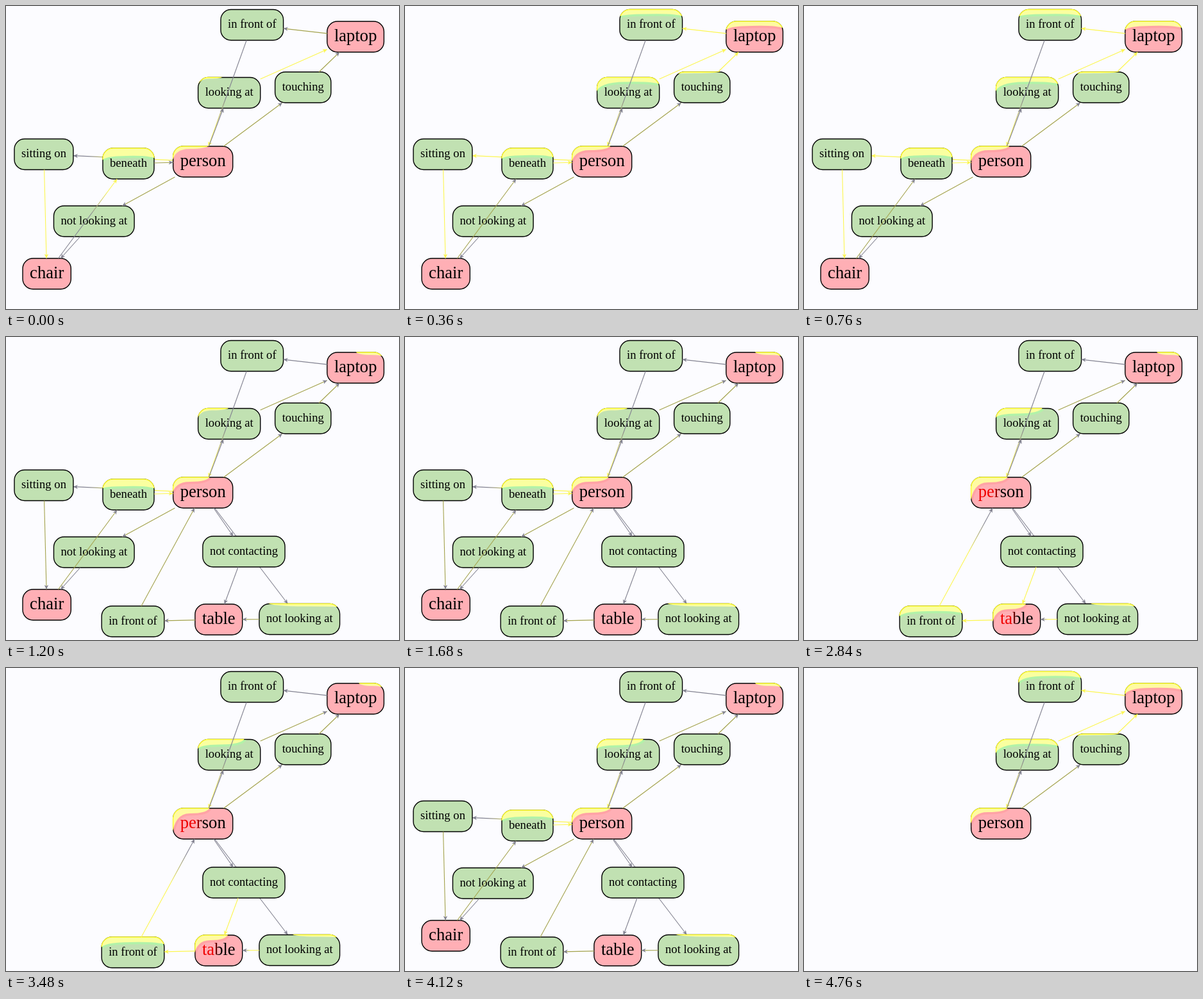
Animation of 613 by 473 pixels, one loop 4.8 s. Source, as an HTML page with a canvas:

```html
<!DOCTYPE html>
<html lang="en">
<head>
<meta charset="utf-8">
<title>Relation graph</title>
<style>
html, body { margin: 0; width: 100%; height: 100%; overflow: hidden; background: #fcfcff; }
canvas { display: block; }
</style>
</head>
<body>
<canvas id="stage" width="613" height="473"></canvas>
<script>
const ctx = document.getElementById('stage').getContext('2d');
const LOOP = 4800, BOX_H = 48, PAD = 11;
const GRAY = '#828290', OLIVE = '#a3a24c', YELLOW = '#fcf650';

// Graph parts: p = person and laptop, c = chair, t = table.
const nodes = {};
function addNode(id, label, cx, cy, group, big) {
  const font = `${big ? 26.67 : 18.67}px "Liberation Serif", "Times New Roman", serif`;
  ctx.font = font;
  const w = ctx.measureText(label).width + PAD * 2;
  nodes[id] = { id, label, cx, cy, w, x: cx - w / 2, y: cy - BOX_H / 2, group, big, font };
}
addNode('person', 'person', 307.2, 243, 'p', true);
addNode('laptop', 'laptop', 545.2, 48, 'p', true);
addNode('front', 'in front of', 383.8, 29.5, 'p');
addNode('looking', 'looking at', 348.2, 135.5, 'p');
addNode('touching', 'touching', 463.3, 127, 'p');
addNode('chair', 'chair', 63.7, 418, 'c', true);
addNode('sitting', 'sitting on', 59, 231.5, 'c');
addNode('beneath', 'beneath', 191, 246, 'c');
addNode('away', 'not looking at', 137.3, 336, 'c');
addNode('table', 'table', 331.8, 441, 't', true);
addNode('apart', 'not contacting', 371, 335, 't');
addNode('before', 'in front of', 198, 444, 't');
addNode('averted', 'not looking at', 457.8, 440.5, 't');

// One tint per look: g gray, o olive, y yellow, a gray to yellow, b yellow to gray.
const edges = [
  ['laptop', 'front', 'oygggy'],
  ['front', 'person', 'aaaaaa'],
  ['person', 'looking', 'gggggg'],
  ['looking', 'laptop', 'yyoooy'],
  ['person', 'touching', 'oooooo'],
  ['touching', 'laptop', 'oyoooy'],
  ['person', 'sitting', 'bybbbb', true],
  ['sitting', 'chair', 'yyoooo'],
  ['chair', 'beneath', 'aooooo'],
  ['beneath', 'person', 'oyyyyy'],
  ['person', 'away', 'oooooo'],
  ['away', 'chair', 'gggggg'],
  ['person', 'apart', 'gggggg'],
  ['person', 'averted', 'gggggg', true],
  ['apart', 'table', 'gggygg'],
  ['averted', 'table', 'ooobob'],
  ['table', 'before', 'oooyoo'],
  ['before', 'person', 'oooboo']
].map(([from, to, tints, behind]) => ({ from: nodes[from], to: nodes[to], tints, behind }));

// Gloss per look: [drop at the side, depth, reach]; a negative reach starts at the right.
const glosses = [
  { beneath: [20, 12, 1], person: [26, 4, .6], looking: [15, 2, .4] },
  { front: [12, 7, 1], laptop: [15, 7, 1], looking: [25, 7, 1], beneath: [18, 11, 1],
    person: [29, 6, .65], touching: [3, 2, .85] },
  { beneath: [15, 11, 1], person: [28, 7, .62], looking: [18, 3, .5],
    laptop: [8, 4, -.5], averted: [5, 4, -.9] },
  { person: [44, 8, .62], looking: [16, 8, .75], table: [33, 8, .7], before: [18, 8, 1],
    laptop: [8, 4, -.45], averted: [5, 3, -.6] },
  { beneath: [18, 10, 1], person: [28, 7, .65], looking: [16, 9, .75],
    laptop: [8, 4, -.5], averted: [5, 3, -.8] },
  { front: [20, 7, 1], laptop: [20, 7, 1], looking: [25, 7, 1], person: [29, 6, .62],
    touching: [3, 2, .85] }
];

const timeline = [
  { at: 0, groups: 'pc', look: 0 },
  { at: 300, groups: 'pc', look: 1 },
  { at: 960, groups: 'pct', look: 2 },
  { at: 1980, groups: 'pt', look: 3 },
  { at: 4040, groups: 'pct', look: 4 },
  { at: 4320, groups: 'pc', look: 4 },
  { at: 4640, groups: 'p', look: 5 }
];

// Where the ray from a node's centre towards another leaves its rectangle.
function border(node, other) {
  const dx = other.cx - node.cx, dy = other.cy - node.cy;
  const k = Math.min(node.w / 2 / Math.abs(dx), BOX_H / 2 / Math.abs(dy));
  return [node.cx + dx * k, node.cy + dy * k];
}

function drawEdge({ from, to, tints }, look) {
  const [x1, y1] = border(from, to), [x2, y2] = border(to, from);
  const [start, end] = {
    g: [GRAY, GRAY], o: [OLIVE, OLIVE], y: [YELLOW, YELLOW],
    a: [GRAY, YELLOW], b: [YELLOW, GRAY]
  }[tints[look]];
  const tint = ctx.createLinearGradient(x1, y1, x2, y2);
  tint.addColorStop(.55, start);
  tint.addColorStop(.85, end);
  ctx.strokeStyle = tint;
  ctx.lineWidth = 1.1;
  ctx.beginPath();
  ctx.moveTo(x1, y1);
  ctx.lineTo(x2, y2);
  ctx.stroke();

  ctx.save();
  ctx.translate(x2, y2);
  ctx.rotate(Math.atan2(y2 - y1, x2 - x1));
  ctx.fillStyle = end === OLIVE ? GRAY : end;
  ctx.beginPath();
  ctx.moveTo(0, 0);
  ctx.lineTo(-7, -3.2);
  ctx.lineTo(-5, 0);
  ctx.lineTo(-7, 3.2);
  ctx.fill();
  ctx.restore();
}

function drawBox(node, fill, stroke) {
  ctx.beginPath();
  ctx.roundRect(node.x, node.y, node.w, BOX_H, 16);
  ctx.fillStyle = fill;
  ctx.fill();
  ctx.strokeStyle = stroke;
  ctx.lineWidth = 1.4;
  ctx.stroke();
}

function glossCurve(path, node, [drop, depth, reach]) {
  const { x, y, w } = node;
  const side = reach < 0 ? -1 : 1, edge = reach < 0 ? x + w : x;
  const far = w * Math.abs(reach), at = k => edge + side * k;
  path.moveTo(at(-2), y + drop);
  path.quadraticCurveTo(at(2), y + depth, at(far * .45), y + depth);
  if (far < w) path.quadraticCurveTo(at(far * .95), y + depth, at(far), y - 2);
  else path.quadraticCurveTo(at(far * .9), y + depth - 1, at(far + 2), y + depth + 4);
  return at;
}

function drawGloss(node, shape) {
  const area = new Path2D(), rim = new Path2D();
  const at = glossCurve(area, node, shape);
  glossCurve(rim, node, shape);
  area.lineTo(at(node.w * Math.abs(shape[2]) + 2), node.y - 3);
  area.lineTo(at(-3), node.y - 3);
  area.closePath();

  if (shape[1] > 5) {
    ctx.save();
    ctx.beginPath();
    ctx.roundRect(node.x + 1, node.y + 1, node.w - 2, BOX_H - 2, 15);
    ctx.clip();
    ctx.strokeStyle = node.big ? '#ffa3a6' : '#b2f2a8';
    ctx.lineWidth = 7;
    ctx.stroke(rim);
    ctx.restore();
  }
  ctx.save();
  ctx.clip(area);
  drawBox(node, node.big ? '#fffaa2' : '#faffa0', '#ffff30');
  ctx.restore();
}

function drawLabel(node, shape) {
  ctx.font = node.font;
  ctx.textAlign = 'center';
  ctx.fillStyle = '#000';
  if (node.big && shape && shape[0] > 30) {
    const ink = ctx.createLinearGradient(node.x, 0, node.x + node.w, 0);
    ink.addColorStop(.38, '#f00000');
    ink.addColorStop(.5, '#000');
    ctx.fillStyle = ink;
  }
  ctx.fillText(node.label, node.cx, node.cy + (node.big ? 7 : 4.7));
}

function drawNode(node, look) {
  const shape = glosses[look][node.id];
  drawBox(node, node.big ? '#ffafb5' : '#c1e1b2', '#000');
  if (shape) drawGloss(node, shape);
  drawLabel(node, shape);
}

function render(now) {
  const t = now % LOOP;
  const { groups, look } = timeline.findLast(step => step.at <= t);
  const shown = node => groups.includes(node.group);
  const live = edges.filter(e => shown(e.from) && shown(e.to));
  ctx.fillStyle = '#fcfcff';
  ctx.fillRect(0, 0, 613, 473);
  live.filter(e => e.behind).forEach(e => drawEdge(e, look));
  Object.values(nodes).filter(shown).forEach(node => drawNode(node, look));
  live.filter(e => !e.behind).forEach(e => drawEdge(e, look));
}

const origin = performance.now();
function tick() {
  render(performance.now() - origin);
  requestAnimationFrame(tick);
}
tick();
</script>
</body>
</html>
```
